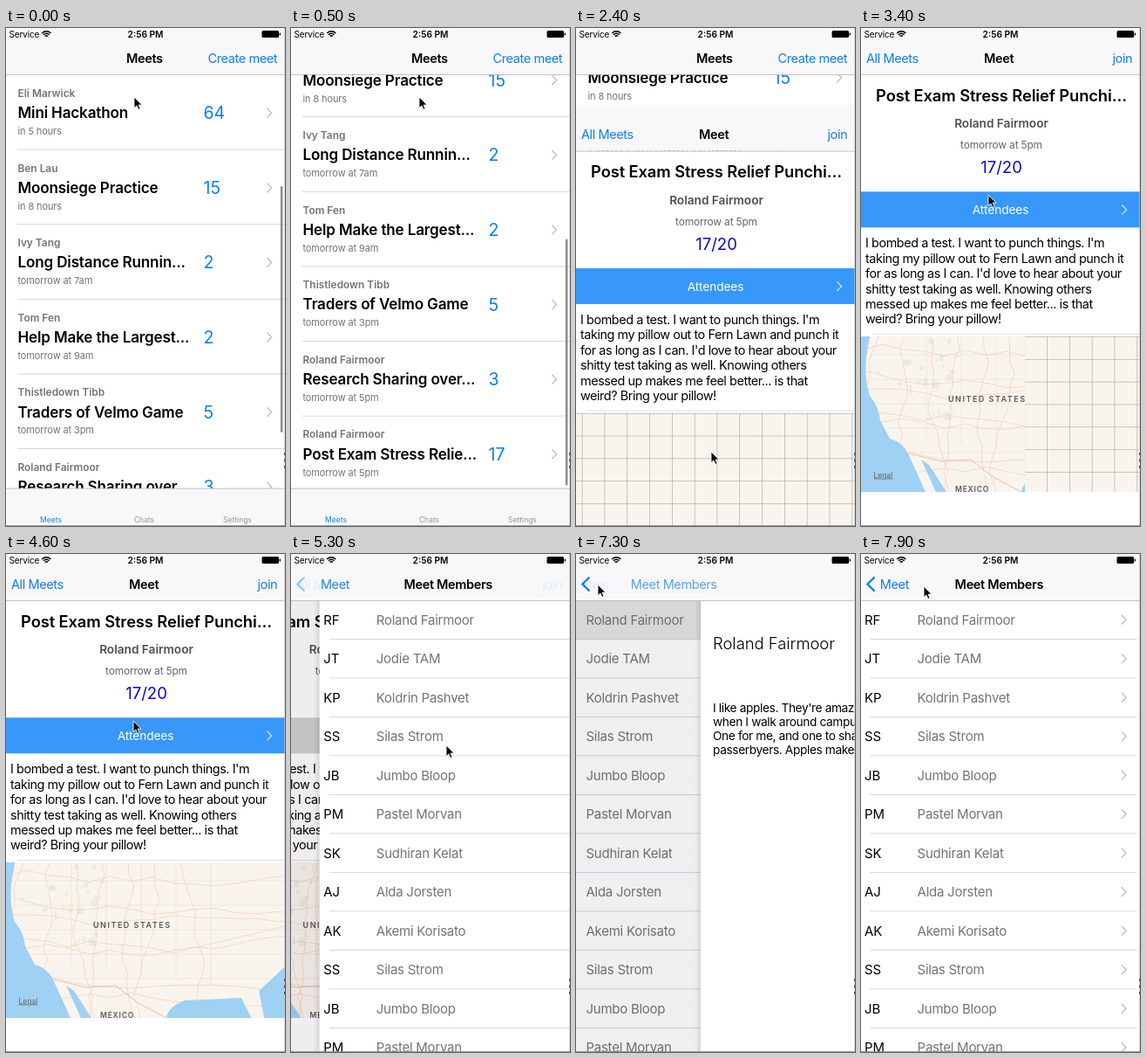
Write an HTML page that moves like this. It is 320 px wide and 570 px high and loops after 8000 ms.

```html
<!DOCTYPE html>
<html lang="en">
<head>
<meta charset="utf-8">
<title>Meets</title>
<style>
  html, body { margin: 0; width: 100%; height: 100%; overflow: hidden; background: #fff; }
  svg { display: block; width: 100vw; height: 100vh; }
  text { font-family: Inter, Roboto, "Liberation Sans", sans-serif; white-space: pre; }
</style>
</head>
<body>
<svg id="stage" viewBox="0 0 320 570" xmlns="http://www.w3.org/2000/svg"></svg>
<script>
const LOOP = 8000, STEP = 100;
const BLUE = '#0c7fee', GRAY = '#747474', NAV_BG = '#f8f8fa', LAND = '#f9f5ee', WATER = '#9fd1f4';
const HOST = 'Roland Fairmoor';

const text = (x, y, str, size, { fill = '#000', weight = 400, ls = 0, anchor = 'start', extra = '' } = {}) =>
  `<text x="${x}" y="${y}" font-size="${size}" fill="${fill}" font-weight="${weight}" letter-spacing="${ls}" text-anchor="${anchor}" ${extra}>${str}</text>`;
const rect = (x, y, w, h, fill, extra = '') =>
  `<rect x="${x}" y="${y}" width="${w}" height="${h}" fill="${fill}" ${extra}/>`;
const path = (d, stroke, width, extra = '') =>
  `<path d="${d}" fill="none" stroke="${stroke}" stroke-width="${width}" ${extra}/>`;
const group = (id, body, extra = '') => `<g id="${id}" ${extra}>${body}</g>`;
const repeat = (count, draw) => Array.from({ length: count }, (_, i) => draw(i)).join('');
const chevron = (y, color = '#c4c4c9') => path(`M299.3 ${y - 5.4}l5.2 5.4l-5.2 5.4`, color, 1.5);
const navText = (x, str, extra = '') => text(x, 39.5, str, 14.5, { fill: BLUE, ls: -0.4, extra });
const navTitle = (x, str, extra = '') => text(x, 39.5, str, 14.5, { weight: 600, ls: -0.35, extra });
const navBar = rect(0, 0, 320, 53, NAV_BG) + rect(0, 53, 320, 0.8, '#b4b4b8');

// List of meets
const meets = [
  ['Eli Marwick', 'Mini Hackathon', 64, 'in 5 hours'],
  ['Ben Lau', 'Moonsiege Practice', 15, 'in 8 hours'],
  ['Ivy Tang', 'Long Distance Runnin...', 2, 'tomorrow at 7am'],
  ['Tom Fen', 'Help Make the Largest...', 2, 'tomorrow at 9am'],
  ['Thistledown Tibb', 'Traders of Velmo Game', 5, 'tomorrow at 3pm'],
  [HOST, 'Research Sharing over...', 3, 'tomorrow at 5pm'],
  [HOST, 'Post Exam Stress Relie...', 17, 'tomorrow at 5pm'],
];
const ROW = 85.6;
const meetRow = ([host, title, count, when], i) => {
  const y = 53.6 + ROW * i;
  const last = i === meets.length - 1;
  return (last ? rect(0, y, 320, ROW, '#d9d9d9', 'id="pickedMeet"') : '') +
    text(13.5, y + 25.3, host, 11.9, { fill: GRAY, weight: 600 }) +
    text(13.5, y + 49.5, title, 17.06, { weight: 600, ls: -0.15 }) +
    text(13.5, y + 68.4, when, 11, { fill: GRAY, ls: -0.12 }) +
    text(226.5, y + 50.6, count, 19.5, { fill: BLUE }) +
    chevron(y + 43.6) + rect(13, y + ROW - 0.5, 307, 0.9, '#d2d2d4');
};
const tabs = ['Meets', 'Chats', 'Settings'].map((name, i) =>
  text(51.5 + 107 * i, 566, name, 8.5, { anchor: 'middle', fill: i ? '#929292' : BLUE })).join('');
const listPage = rect(0, 0, 320, 570, '#fff') + group('rows', meets.map(meetRow).join('')) +
  rect(314.8, 181, 2.6, 282, '#8c8c8c', 'id="bar" rx="1.3"') +
  navBar + navTitle(138, 'Meets') + navText(231.5, 'Create meet') +
  rect(0, 527, 320, 43, NAV_BG) + rect(0, 526.7, 320, 0.8, '#b4b4b8') + tabs;

// Map: a coast through a few points, with seeded woods and roads
let seed = 7;
const random = (from, to) => {
  seed = seed * 16807 % 2147483647;
  return from + (to - from) * seed / 2147483647;
};
const west = 'M13 340L8 365Q2 395 10 421Q20 432 22 449L33 470Q48 474 54 487L70 522L78 540';
const gulf = 'L90 540L69 494L78 500L104 540';
const east = 'L184 540Q180 520 205 511L270 508L286 540L298 540L290 500L328 465V340Z';
const woods = repeat(26, () => {
  const x = random(12, 110), y = random(353, 455);
  return `<ellipse cx="${x}" cy="${y}" rx="${random(1, 5)}" ry="${random(1, 6)}" fill="#dfead0" opacity=".6"/>`;
});
const road = i => {
  const across = i % 2;
  let d = across ? `M0 ${358 + 11 * i}` : `M${20 + 15 * i} 353`;
  for (let k = 0; k < 14; k++) d += across ? `l24 ${random(-7, 7)}` : `l${random(-6, 6)} 14`;
  return path(d, '#f7cdbb', 0.7);
};
const stateLine = i => path(`M${75 + 40 * i} 353V${470 + 6 * i}M10 ${374 + 28 * i}H320`, '#e8dfd6', 0.6);
const label = (x, y, str, size, ls) => text(x, y, str, size, { fill: '#5b5858', weight: 600, ls });
const mapArt = rect(0, 353, 320, 178, WATER) +
  `<clipPath id="land"><path d="${west + gulf + east}"/></clipPath>` +
  `<g clip-path="url(#land)">${rect(0, 340, 340, 200, LAND) + woods + repeat(5, stateLine) + repeat(14, road)}` +
  path('M54 487L92 496L126 494L150 513L184 531', '#eab6a6', 0.9) + '</g>' +
  label(100, 427.5, 'UNITED STATES', 9, 1.5) + label(108, 531, 'MEXICO', 8.5, 0.8);
const GRID = 25.8;
const grid = rect(0, 353, 320, 178, LAND) +
  repeat(13, i => rect(6.8 + GRID * i, 353, 0.7, 178, '#b3afaa')) +
  repeat(7, i => rect(0, 353.2 + GRID * i, 320, 0.7, '#b3afaa'));

// Meet details
const story = [
  "I bombed a test. I want to punch things. I'm", 'taking my pillow out to Fern Lawn and punch it',
  "for as long as I can. I'd love to hear about your", 'shitty test taking as well. Knowing others',
  'messed up makes me feel better... is that', 'weird? Bring your pillow!',
];
const middle = (y, str, size, opts) => text(161, y, str, size, { anchor: 'middle', ...opts });
const detailPage = rect(0, 53, 320, 517, '#fff') +
  middle(83.8, 'Post Exam Stress Relief Punchi...', 18.3, { weight: 600, ls: -0.08 }) +
  middle(114, HOST, 13.65, { weight: 600, fill: '#505050' }) +
  middle(138.2, 'tomorrow at 5pm', 11.9, { fill: '#666', ls: -0.15 }) +
  middle(166, '17/20', 18.5, { fill: '#0808cf' }) +
  rect(0, 187.3, 320, 41, '#3797fb', 'id="attendees"') +
  text(160, 213, 'Attendees', 13.65, { fill: '#fff', anchor: 'middle', ls: -0.08 }) + chevron(208, '#bddafa') +
  story.map((line, i) => text(5, 251.4 + 17.4 * i, line, 14.4, { ls: -0.43 })).join('') +
  rect(13, 350, 307, 0.8, '#d8d8da') + grid +
  ['West', 'East'].map(side => group('tile' + side, mapArt, `clip-path="url(#clip${side})"`)).join('') +
  text(14.5, 514.5, 'Legal', 8.5, { fill: '#666', extra: 'id="legal" text-decoration="underline"' });

// Members: the last names repeat
const people = [
  HOST, 'Jodie TAM', 'Koldrin Pashvet', 'Silas Strom', 'Jumbo Bloop', 'Pastel Morvan', 'Sudhiran Kelat',
  'Alda Jorsten', 'Akemi Korisato',
];
const initials = name => name.split(' ').map(word => word[0]).join('');
const memberRow = i => {
  const y = 75.2 + 44.5 * i;
  const name = people[i < people.length ? i : i - 6];
  return text(4.5, y + 5.4, initials(name), 15, { ls: -0.2 }) +
    text(65, y + 5.4, name, 15, { fill: GRAY, ls: -0.25 }) +
    chevron(y) + rect(11, y + 21.8, 306, 0.8, '#cfcfd2');
};
const membersPage = rect(0, 53, 320, 517, '#fff') +
  rect(0, 53.5, 320, 44, '#d0d0d0', 'id="pickedMember"') + repeat(12, memberRow);

// Profile
const bio = [
  "I like apples. They're amazing. Sometimes", 'when I walk around campus, I carry two.',
  'One for me, and one to share with', 'passerbyers. Apples make my life better.',
];
const profilePage = rect(0, 53, 320, 517, '#fff') + text(14, 109, HOST, 18.4, { weight: 300 }) +
  bio.map((line, i) => text(14, 180.5 + 16.3 * i, line, 13.65, { ls: -0.35 })).join('');

const dim = id => rect(0, 53, 320, 517, '#2a052a', `id="${id}"`);
const shadow = rect(-7, 53, 7, 517, 'url(#edge)');
const modal = group('detail', detailPage) + dim('dimDetail') +
  group('members', shadow + membersPage) + dim('dimMembers') +
  group('profile', shadow + profilePage) + navBar +
  group('meetItems', navText(6, 'All Meets') + navText(288.5, 'join')) +
  path('M15.5 26.5l-8 8l8 8', BLUE, 2.4, 'id="back"') +
  navTitle(0, 'Meet', 'id="meetTitle"') + navText(0, 'Meet', 'id="meetBack"') +
  navTitle(0, 'Meet Members', 'id="membersTitle"') + navText(0, 'Meet Members', 'id="membersBack"');

const wifi = repeat(3, i => {
  const r = 2.2 + 2.4 * i;
  return path(`M${46.3 - r * 0.72} ${11 - r * 0.72}a${r} ${r} 0 0 1 ${r * 1.44} 0`, '#000', 1.5);
});
const statusBar = text(3.5, 10.8, 'Service', 10, { ls: -0.15 }) + wifi +
  text(160, 10.8, '2:56 PM', 10.2, { weight: 600, anchor: 'middle' }) +
  rect(293.5, 3, 19.5, 8, '#000', 'rx="1.6"') + rect(313.6, 5.4, 1.3, 3.2, '#000', 'rx=".6"');
const screenEdge = rect(319.3, 0, 0.7, 570, '#bdbdbd') + rect(0, 569.2, 320, 0.8, '#8a8a8a') +
  repeat(3, i => rect(319, 486 + 7.5 * i, 1, 3, '#444'));
const pointer = '<path d="M0 0V12.6L2.9 9.9L4.9 14.4L7 13.5L5 9.1H9Z" fill="#000" stroke="#fff" stroke-width=".9"/>';

document.getElementById('stage').innerHTML = `<defs>
  <clipPath id="clipWest"><rect y="353" width="188" height="178"/></clipPath>
  <clipPath id="clipEast"><rect x="188" y="353" width="132" height="178"/></clipPath>
  <linearGradient id="edge"><stop stop-opacity="0"/><stop offset="1" stop-opacity=".1"/></linearGradient>
</defs>` + group('list', listPage) + group('modal', modal) + statusBar + screenEdge + group('pointer', pointer);

const parts = Object.fromEntries([...document.querySelectorAll('#stage [id]')].map(el => [el.id, el]));
const clamp = v => Math.min(1, Math.max(0, v));
const ramp = (t, from, to) => clamp((t - from) / (to - from));
const smooth = p => p * p * (3 - 2 * p);
const move = (id, x, y = 0) => parts[id].setAttribute('transform', `translate(${x.toFixed(2)} ${y.toFixed(2)})`);
const fade = (id, value) => parts[id].setAttribute('opacity', clamp(value).toFixed(3));
// Critically damped spring: 1 before the start, settling to 0
const settle = ms => { const x = Math.max(0, ms) / 100; return (1 + x) * Math.exp(-x); };

// Pointer stops after the first one
const stops = [
  { from: 500, to: 1300, x: 155, y: 485 }, { from: 2600, to: 3300, x: 146, y: 191 },
  { from: 4900, to: 5300, x: 178, y: 219 }, { from: 5500, to: 6000, x: 168, y: 89 },
  { from: 6600, to: 7000, x: 25, y: 35 }, { from: 7400, to: 7800, x: 72, y: 37 },
];
const pointerAt = t => stops.reduce(([x, y], stop) => {
  const p = smooth(ramp(t, stop.from, stop.to));
  return [x + (stop.x - x) * p, y + (stop.y - y) * p];
}, [147, 79]);

function render(t) {
  const scrolled = 1 - (1 - ramp(t, 0, 700)) ** 3;
  move('rows', 0, -126 * scrolled);
  move('bar', 0, 62 * scrolled);
  fade('bar', 1 - ramp(t, 600, 900));
  fade('pickedMeet', t >= 1700 ? 1 : 0);

  move('modal', 0, 570 * settle(t - 2066));
  fade('tileWest', ramp(t, 2900, 3100));
  fade('legal', ramp(t, 2900, 3100));
  fade('tileEast', ramp(t, 3500, 3700));
  parts.attendees.setAttribute('fill', t >= 4700 ? '#d0d0d0' : '#3797fb');

  // 1 = still off to the right, 0 = in place
  const membersOff = settle(t - 4911);
  const profileOff = t < 7150 ? settle(t - 6175) : 1 - settle(t - 7150);
  move('detail', -96 * (1 - membersOff));
  move('members', 328 * membersOff - 96 * (1 - profileOff));
  move('profile', 328 * profileOff - 2);
  parts.profile.setAttribute('visibility', profileOff > 0.995 ? 'hidden' : 'visible');
  fade('dimDetail', 0.08 * (1 - membersOff));
  fade('dimMembers', 0.12 * (1 - profileOff));
  fade('pickedMember', t < 6100 ? 0 : settle(t - 7150));

  fade('meetItems', membersOff);
  fade('back', 1 - 6 * membersOff);
  const meetX = 22 + 119 * membersOff - 30 * (1 - profileOff);
  move('meetTitle', meetX);
  move('meetBack', meetX);
  fade('meetTitle', 2 * membersOff - 1);
  fade('meetBack', (1 - membersOff) * profileOff ** 3);
  const membersX = 27 + 81 * profileOff + 215 * membersOff;
  move('membersTitle', membersX);
  move('membersBack', membersX);
  fade('membersTitle', 3 * (1 - membersOff) * (2 * profileOff - 1));
  fade('membersBack', 1.25 * (1 - profileOff));

  move('pointer', ...pointerAt(t));
}

const start = performance.now();
function tick() {
  const t = (performance.now() - start) % LOOP;
  render(Math.floor(t / STEP) * STEP);
  requestAnimationFrame(tick);
}
tick();
</script>
</body>
</html>
```
